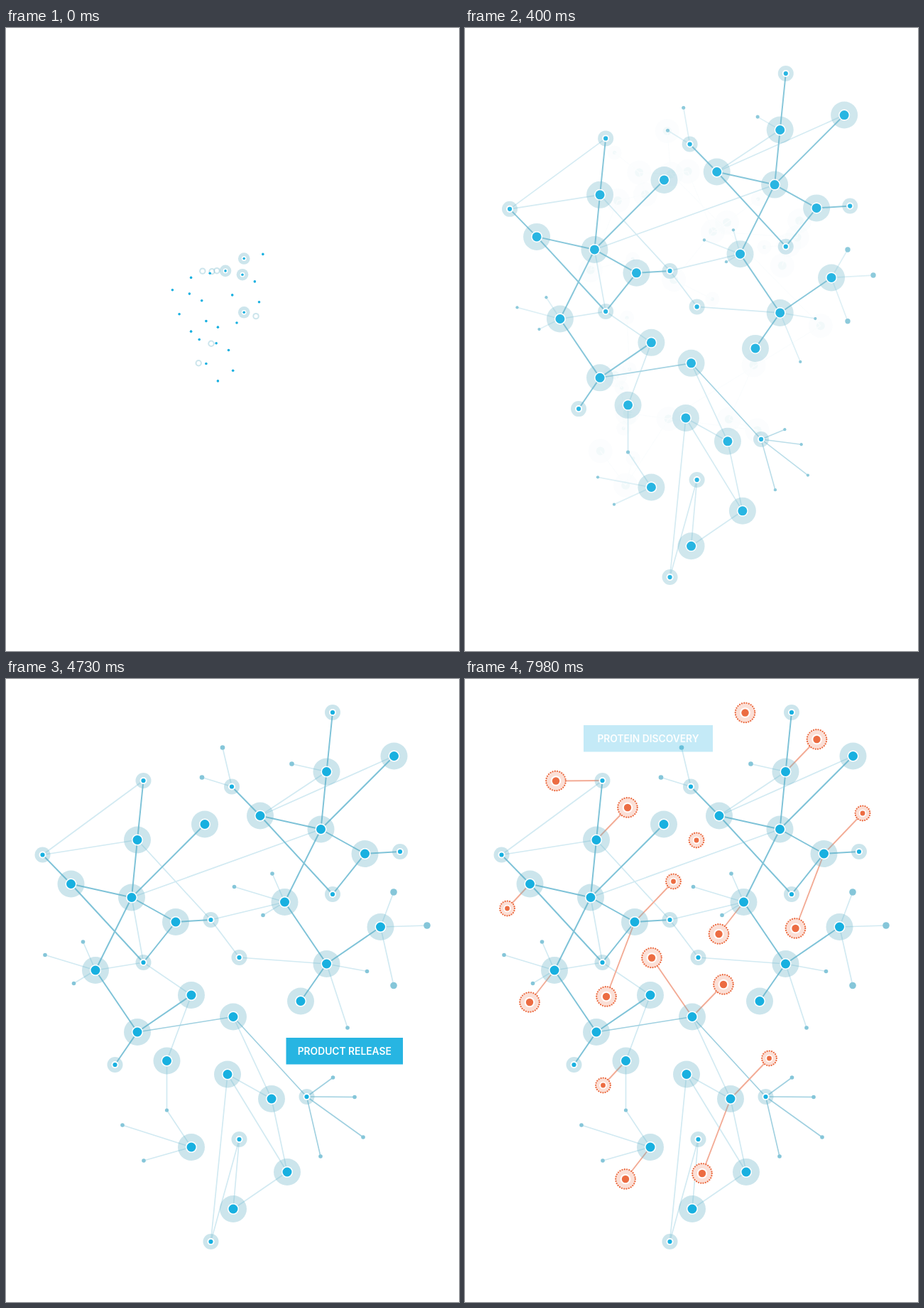
Recreate the animation shown at these times as an HTML page. Size 638 by 877 pixels, loop 8000 ms.

```html
<!DOCTYPE html>
<html lang="en">
<head>
<meta charset="utf-8">
<title>Network</title>
<style>
html, body { margin: 0; width: 100%; height: 100%; overflow: hidden; background: #fff; }
svg { display: block; width: 100vw; height: 100vh; }
text { font: 600 13.8px Inter, "Open Sans", sans-serif; fill: #fff; text-anchor: middle; }
</style>
</head>
<body>
<svg id="stage" viewBox="0 0 638 877"></svg>
<script>
const LOOP = 8000, OPEN = 480, CENTER = [290, 400];
const BLUE = '#18b0e0', TINT = '#60aec4', SOFT = '#85c6d9', ORANGE = '#ec6c42';
const LIGHT = ['#d2eaf2', 1.7], MEDIUM = ['#9fd0e0', 1.6], STRONG = ['#7fc3d8', 2];
const stage = document.getElementById('stage');

function set(e, attrs) { for (const k in attrs) e.setAttribute(k, attrs[k]); }
function el(tag, attrs, parent = stage) {
  const e = document.createElementNS('http://www.w3.org/2000/svg', tag);
  set(e, attrs);
  return parent.appendChild(e);
}
const group = parent => el('g', {}, parent);
const line = (parent, [color, width]) => el('line', { stroke: color, 'stroke-width': width }, parent);
const disc = (parent, fill, alpha = 1) => el('circle', { fill, 'fill-opacity': alpha }, parent);
const join = (e, a, b) => set(e, { x1: a[0], y1: a[1], x2: b[0], y2: b[1] });
const place = (e, p, r) => set(e, { cx: p[0], cy: p[1], r });
const add = (a, b) => [a[0] + b[0], a[1] + b[1]];

const clamp = v => Math.max(0, Math.min(1, v));
const swing = v => 0.5 - Math.cos(Math.PI * clamp(v)) / 2;
const out = v => Math.sin(clamp(v) * Math.PI / 2);
const mix = (a, b, p) => a + (b - a) * p;
const mixPt = (a, b, p) => [mix(a[0], b[0], p), mix(a[1], b[1], p)];

let seed = 7;
function rand() {
  seed = (seed * 16807) % 2147483647;
  return seed / 2147483647;
}

const ghostLayer = group(), net = group(), marks = group();
const [leafLayer, edgeLayer, markLines, dots, nodeLayer] = Array.from({ length: 5 }, () => group(net));

// One cluster, laid out three times; a node is named by letter and copy, as in H1
const cluster = {
  A: [185, 226.5], E: [280, 204.5], H: [177, 307.5], L: [91.5, 288.5], M: [239, 342],
  D: [126, 410], F: [261, 445], G: [185, 497],
  T: [193.5, 143], W: [51.5, 247.5], R: [288.5, 339], B: [193.5, 399], S: [153.5, 543]
};
const shifts = [[0, 0], [266.5, -96], [135, 249]];
const absent = ['S1', 'W2'];

const nodes = {};
function addNode(key, end, size, color = BLUE) {
  nodes[key] = {
    end, size,
    seed: size[0] > 15 ? 1.8 : 0,
    ring: ['A1', 'H1', 'L1', 'G1'].includes(key) ? 8.3 : 0,
    halo: disc(nodeLayer, TINT, 0.32), gap: disc(nodeLayer, '#fff'), core: disc(nodeLayer, color)
  };
}
shifts.forEach((shift, copy) => {
  for (const k in cluster) {
    if (absent.includes(k + copy)) continue;
    addNode(k + copy, add(cluster[k], shift), 'TWRBS'.includes(k) ? [11, 5, 3.1] : [19, 8, 6.5]);
  }
});
addNode('X0', [226.5, 607], [0, 0, 2.6], SOFT);

const edges = [];
function addEdges(list, style) {
  for (const pair of list.split(' ')) {
    const [a, b] = pair.split('-');
    edges.push({ a: nodes[a], b: nodes[b], e: line(edgeLayer, style) });
  }
}
addEdges('T0-W0 W0-A0 A0-R0 H0-H1 H0-B0 B0-F0 B0-D0 R0-D1 R0-T2 T2-G1 F0-L2 L2-X0 X0-D2 L1-A1 L1-E1', LIGHT);
addEdges('A2-M2 H2-M2 H2-F2 M2-F2 F2-G2 H2-S2 B2-S2 B2-G2', LIGHT);
addEdges('G0-A2 A2-R2', MEDIUM);
for (const copy of [0, 1])
  addEdges('T-A A-H E-H H-L H-M H-D M-R M-B L-B W-L D-G G-F'.replace(/\w/g, '$&' + copy), STRONG);
addEdges('G0-S0 G1-E2', STRONG);

const spray = [[-17.5, -40], [-71, -21.5], [-30.5, 18.5]];
const fans = {
  D0: spray, D1: spray, D2: [[-97, -31], [-67, 19]],
  W1: [[-13, -55], [-42, -13]], A1: [[-49, -11]],
  F1: [[18.5, -49], [65.5, -2], [18.5, 82.5]], G1: [[57, 10.5], [29.5, 90]],
  R2: [[37, -27], [67.5, 0.5], [79.5, 57], [19.5, 84]]
};
const twigs = Object.entries(fans).flatMap(([key, fan]) => fan.map(offset => ({
  root: nodes[key], end: add(nodes[key].end, offset),
  r: { F1: 4.8, W1: 3.3, A1: 3.3 }[key] || 2.8,
  e: line(leafLayer, key === 'R2' ? MEDIUM : LIGHT), dot: disc(dots, SOFT)
})));

// Fading layer of random nodes, each tied to its nearest earlier neighbour
const ghosts = Array.from({ length: 34 }, (_, i) => {
  const turn = rand() * 2 * Math.PI, far = Math.sqrt(rand());
  return {
    end: [310 + 210 * far * Math.cos(turn), 420 + 310 * far * Math.sin(turn)],
    ring: i < 6 ? 4.7 : 0, size: i < 23 ? [17, 6] : [10, 2.6],
    halo: disc(ghostLayer, TINT, 0.32), gap: disc(ghostLayer, '#fff'), core: disc(ghostLayer, '#4fadc6')
  };
});
const distance = (a, b) => Math.hypot(a.end[0] - b.end[0], a.end[1] - b.end[1]);
const ghostLines = ghosts.slice(1).map((a, i) => ({
  a, b: ghosts.slice(0, i + 1).reduce((m, g) => distance(a, g) < distance(a, m) ? g : m),
  e: line(ghostLayer, ['#c4e2ec', 1.2])
}));

// Orange markers repeat at the same offsets in every copy
const motif = [
  ['L', [-32, 34.5], 0], ['D', [-35, 45], 1], ['M', [54.5, -57], 0],
  ['A', [44, -45.5], 1], ['M', [-40, 105], 1], ['T', [-65.5, 0.5], 1]
];
const links = { L1: null, T1: null, T2: 'A2' };

function marker(key, offset, large) {
  const p = add(nodes[key].end, offset), g = group(marks), parts = [g];
  const r = large ? 13.8 : 10.4, count = large ? 26 : 20;
  place(disc(g, '#fbdfd6'), p, r);
  place(disc(g, '#fff'), p, large ? 7.3 : 5.2);
  place(disc(g, ORANGE), p, large ? 5.2 : 3.4);
  el('circle', {
    cx: p[0], cy: p[1], r, fill: 'none', stroke: ORANGE, 'stroke-width': 2.3,
    'stroke-linecap': 'round', 'stroke-dasharray': '0 ' + 2 * Math.PI * r / count
  }, g);
  const link = key in links ? links[key] : key;
  if (link) {
    const e = line(markLines, ['#f3ab95', 1.9]);
    join(e, p, nodes[link].end);
    parts.push(e);
  }
  return parts;
}
const signs = motif.flatMap(([k, offset, large]) => [1, 0, 2].map(copy => marker(k + copy, offset, large)));

function label(x, y, w, h, words) {
  const g = group();
  el('rect', { x, y, width: w, height: h, fill: BLUE }, g);
  el('text', { x: x + w / 2, y: y + h / 2 + 4.8 }, g).textContent = words;
  return g;
}
const release = label(394.5, 505, 164.5, 37.5, 'PRODUCT RELEASE');
const discovery = label(167, 65, 182, 37.5, 'PROTEIN DISCOVERY');

function drawNet(t) {
  const spread = mix(0.28, 1, swing(t / OPEN));
  const grow = out(t / 240), lines = swing((t - 40) / 220), late = out((t - 300) / 180);
  const at = n => n.at = mixPt(CENTER, n.end, spread);

  for (const n of Object.values(nodes)) {
    const p = at(n), [halo, gap, core] = n.size;
    place(n.halo, p, mix(n.ring, halo, grow));
    place(n.gap, p, mix(n.ring && 3.4, gap, grow));
    place(n.core, p, mix(n.seed, core, grow));
  }
  for (const { a, b, e } of edges) join(e, a.at, b.at);
  edgeLayer.setAttribute('opacity', lines);

  for (const w of twigs) {
    const tip = mixPt(w.root.at, w.end, late);
    join(w.e, w.root.at, tip);
    place(w.dot, tip, w.r * late);
  }
  leafLayer.setAttribute('opacity', late);
  net.setAttribute('opacity', 1 - 0.14 * Math.sin(Math.PI * t / OPEN));

  for (const g of ghosts) {
    const p = at(g);
    place(g.halo, p, mix(g.ring, g.size[0], grow));
    place(g.gap, p, g.ring && 2.7);
    place(g.core, p, g.size[1] * grow);
  }
  for (const { a, b, e } of ghostLines) {
    join(e, a.at, b.at);
    e.setAttribute('opacity', lines);
  }
  ghostLayer.setAttribute('opacity', 1 - swing(t / OPEN));
}

// Labels fade in six steps of 50 ms
const fade = (t, from) => t < from ? 0 : swing((Math.floor((t - from) / 50) + 1) / 6);

let last = -1;
function draw(t) {
  const open = Math.min(OPEN, Math.floor(t / 20) * 20);
  if (open !== last) drawNet(last = open);
  release.setAttribute('opacity', fade(t, 1480) - fade(t, 4730));
  discovery.setAttribute('opacity', fade(t, 7930));
  signs.forEach((parts, i) => {
    const on = t >= 6980 + 50 * Math.min(i, 16);
    for (const e of parts) e.setAttribute('visibility', on ? 'visible' : 'hidden');
  });
}

const began = performance.now();
function tick() {
  draw((performance.now() - began) % LOOP);
  requestAnimationFrame(tick);
}
draw(0);
requestAnimationFrame(tick);
</script>
</body>
</html>
```
